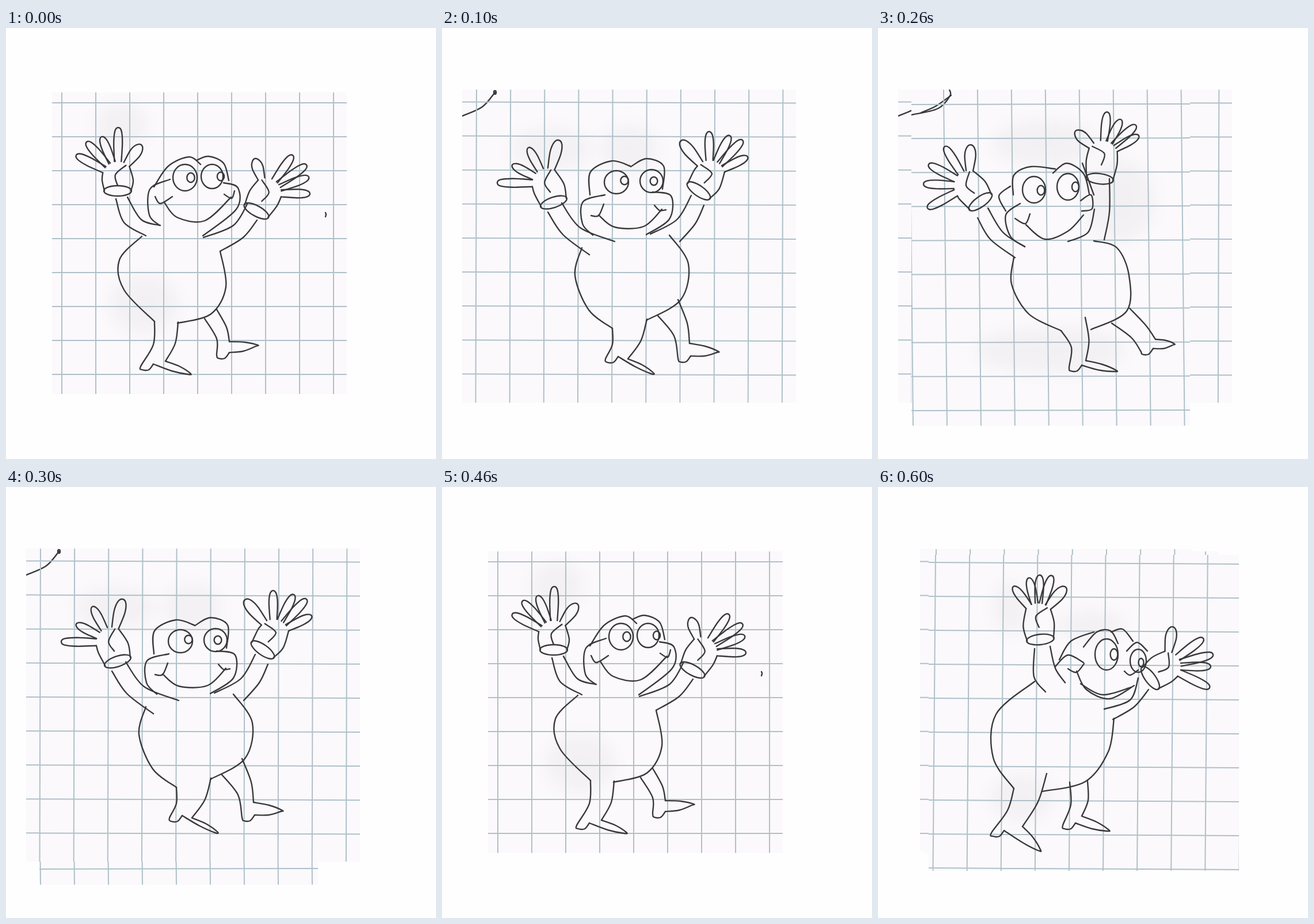
These frames come from a looping animation (747 px wide and 749 px high, 0.7 s). An HTML page:

```html
<!DOCTYPE html>
<html lang="en">
<head>
<meta charset="utf-8">
<title>Waving pencil figure</title>
<style>
html, body { margin: 0; width: 100%; height: 100%; overflow: hidden; background: #fefefe; }
#stage { display: block; width: 747px; height: 749px; }
.ink { fill: none; stroke: #39393b; stroke-width: 2.4; stroke-linecap: round; stroke-linejoin: round; }
.grid { fill: none; stroke: #afc0ca; stroke-width: 2; }
.smudge { fill: #77707a; opacity: .06; filter: url(#soft); }
.layer { animation: 700ms step-end infinite; }
</style>
</head>
<body>
<svg id="stage" viewBox="0 0 747 749">
<defs><filter id="soft" x="-50%" y="-50%" width="200%" height="200%"><feGaussianBlur stdDeviation="14"/></filter></defs>
</svg>
<script>
const points = text => text.trim().split(/\s+/).map(s => s.split(',').map(Number));
const add = (a, b, k = 1) => [a[0] + b[0] * k, a[1] + b[1] * k];
const mix = (a, b, k = .5) => [a[0] + (b[0] - a[0]) * k, a[1] + (b[1] - a[1]) * k];
const unit = (a, b) => {
  const d = [b[0] - a[0], b[1] - a[1]], len = Math.hypot(...d);
  return [d[0] / len, d[1] / len];
};
const normal = u => [-u[1], u[0]];

// A smooth pencil line through the given points.
function line(p) {
  const at = i => p[Math.max(0, Math.min(p.length - 1, i))];
  let d = 'M' + p[0];
  for (let i = 0; i < p.length - 1; i++) {
    const [a, b, c, e] = [at(i - 1), at(i), at(i + 1), at(i + 2)];
    d += `C${add(b, add(c, a, -1), 1 / 6)} ${add(c, add(b, e, -1), 1 / 6)} ${c}`;
  }
  return `<path class="ink" d="${d}"/>`;
}
const draw = text => text.split('/').map(s => line(points(s))).join('');
const oval = (x, y, rx, ry, cls = 'ink', turn = 0) =>
  `<ellipse class="${cls}" cx="${x}" cy="${y}" rx="${rx}" ry="${ry}" transform="rotate(${turn} ${x} ${y})"/>`;
const smudge = (...o) => oval(...o, 'smudge');
const eye = (x, y, rx, ry, px, py) => oval(x, y, rx, ry) + oval(px, py, rx * .32, ry * .36);

// Fingers fan out of the palm from the little finger to the thumb.
function hand(text) {
  const [palm, wrist, ...tips] = points(text);
  const up = unit(wrist, palm), across = normal(up);
  const first = unit(palm, tips[0]), last = unit(palm, tips[tips.length - 1]);
  const side = Math.sign(first[0] * last[1] - first[1] * last[0]);
  const edge = (u, s) => line([
    add(add(palm, u, 26), normal(u), 6 * s),
    add(add(mix(palm, wrist, .35), across, 27 * s), up, 2),
    add(wrist, across, 23 * s)
  ]);
  const fingers = tips.map((tip, i) => {
    const w = i === tips.length - 1 ? 9.5 : 7.5, u = unit(palm, tip), n = normal(u);
    const base = add(palm, u, 26), mid = mix(base, tip, .55), round = add(tip, u, -6);
    return line([add(base, n, 6), add(mid, n, w), add(round, n, w * .75), tip,
      add(round, n, -w * .75), add(mid, n, -w), add(base, n, -6)]);
  }).join('');
  const turn = Math.atan2(across[1], across[0]) * 180 / Math.PI;
  const crease = line([add(palm, last, 24), add(palm, normal(last), -5 * side), add(palm, up, -16)]);
  return fingers + edge(first, -side) + edge(last, side) + crease + oval(...wrist, 24, 9, 'ink', turn);
}

// Back of hip, back of knee, heel, toe, instep, front of hip.
function leg(text) {
  const [back, knee, heel, toe, instep, front] = points(text);
  const arch = add(heel, [22, -4]);
  return line([back, knee, heel, add(heel, [3, 6]), add(heel, [14, 6]), arch]) +
    line([arch, add(mix(arch, toe), [0, 4]), add(toe, [-3, 2]), toe, add(mix(toe, instep), [2, -2]), instep]) +
    line([instep, add(mix(instep, front), [6, 3]), front]);
}

// Squared paper cut to a box; v and h are [first, pitch, lean].
function sheet([x, y, right, bottom], v, h, extra = '') {
  let d = '';
  for (let k = 0; k < 10; k++) {
    const gx = v[0] + k * v[1], gy = h[0] + k * h[1];
    d += `M${gx} ${y}L${gx + v[2]} ${bottom}M${x} ${gy}L${right} ${gy + h[2]}`;
  }
  const w = right - x, t = bottom - y;
  return `<svg x="${x}" y="${y}" width="${w}" height="${t}" viewBox="${x} ${y} ${w} ${t}">
    <rect x="${x}" y="${y}" width="${w}" height="${t}" fill="#fbf9fb"/>${extra}<path class="grid" d="${d}"/></svg>`;
}

const reach = () => {
  const hands = hand('194,258 194,283 122,221 140,198 166,189 195,173 235,203') +
    hand('452,287 435,318 528,288 526,259 522,238 498,221 432,227');
  const eyes = eye(311, 260, 21, 23, 321, 260) + eye(358, 258, 19, 21, 373, 258);
  const head = draw(`257,276 282,240 318,224 338,237 / 331,230 352,223 378,235 387,265 /
    285,263 250,280 249,325 267,343 / 259,293 268,305 289,293 /
    378,269 403,278 400,315 342,361 / 379,289 392,296 397,283`);
  const smile = draw('275,303 297,329 345,335 391,294');
  const arms = draw('191,297 205,338 243,361 / 211,294 235,333 268,343 / 420,304 395,343 343,364 / 436,334 412,364 372,388');
  const body = draw('236,362 197,403 205,455 258,510 / 372,388 382,450 356,497 298,513');
  const legs = leg('258,510 256,550 234,588 320,600 277,579 299,511') +
    leg('345,505 366,540 366,568 437,551 388,545 366,489');
  return hands + eyes + head + smile + arms + body + legs;
};

const cheer = () => {
  const hands = hand('183,270 194,303 96,269 122,238 150,208 203,195') +
    hand('465,256 446,283 531,224 522,195 500,187 464,180 415,196');
  const eyes = eye(303, 268, 21, 20, 317, 265) + eye(364, 266, 20, 20, 368, 266);
  const head = draw(`283,290 245,302 244,340 262,360 / 257,290 258,250 295,231 327,240 /
    328,241 355,227 385,240 383,280 / 366,285 398,292 395,332 355,359 /
    259,326 272,326 281,306 / 369,308 378,317 389,316`);
  const smile = draw('272,325 300,346 350,345 382,315');
  const arms = draw('184,320 210,359 256,394 / 208,304 240,347 300,371 / 433,291 408,333 362,358 / 455,308 440,340 413,371');
  const body = draw('243,382 231,430 255,490 296,522 / 395,360 428,410 415,472 355,508');
  const legs = leg('296,522 296,550 284,575 367,599 323,575 356,506') +
    leg('375,500 403,535 410,574 480,562 430,548 410,472');
  return hands + eyes + head + smile + arms + body + legs;
};

const lean = () => {
  const hands = hand('158,274 178,302 86,313 79,271 88,237 116,206 161,203') +
    hand('390,222 385,262 453,187 448,169 422,159 398,146 343,179');
  const eyes = eye(271, 281, 20, 23, 283, 282) + eye(330, 276, 19, 23, 343, 276);
  const head = draw(`230,275 210,292 222,318 / 235,290 236,256 265,241 308,245 /
    304,252 328,235 357,253 367,288 / 355,235 375,290 / 247,305 222,325 230,362 255,380 /
    238,331 256,340 264,323 / 352,300 370,290 372,314 354,318 / 376,315 365,355 330,371`);
  const smile = draw('257,342 290,367 330,353 357,325');
  const arms = draw('173,330 195,367 238,399 / 191,313 217,355 255,380 / 402,262 402,320 393,368');
  const body = draw('236,399 232,445 262,497 318,526 / 375,370 415,382 436,430 432,492 370,524');
  const legs = leg('318,526 336,555 332,590 414,595 361,578 360,503') +
    leg('406,513 440,538 456,561 515,549 482,541 437,487');
  return hands + eyes + head + smile + arms + body + legs;
};

const turn = () => {
  const hands = hand('216,246 226,278 164,192 184,180 198,174 220,155 254,187') +
    hand('443,297 423,316 512,326 522,286 520,267 506,242 440,230');
  const eyes = eye(333, 282, 20, 26, 344, 284) + eye(383, 295, 18, 16, 390, 297);
  const head = draw(`257,320 272,280 315,256 / 262,300 280,293 297,301 / 255,310 258,338 275,358 /
    278,322 290,330 304,316 / 307,255 332,238 357,248 364,275 / 360,255 376,251 388,264 /
    362,278 395,262 413,293 / 405,312 395,350 352,377 / 384,312 392,319 403,314`);
  const smile = draw('287,332 308,355 360,357 404,330');
  const arms = draw('215,294 225,335 254,368 / 241,290 258,335 284,362 / 235,292 252,335 280,361 / 424,332 400,372 373,396');
  const body = draw('236,357 199,408 205,475 232,504 / 373,396 388,435 360,495 291,523');
  const legs = leg('232,504 239,545 216,588 292,599 257,577 294,511') +
    leg('330,513 345,535 334,576 418,574 371,556 363,498');
  return hands + eyes + head + smile + arms + body + legs;
};

const shout = () => {
  const hands = hand('278,228 282,265 235,173 262,158 281,153 302,154 326,174') +
    hand('500,312 473,332 576,349 578,312 582,291 565,263 512,243');
  const eyes = eye(397, 291, 20, 27, 410, 291) + eye(452, 302, 14, 20, 457, 305);
  const head = draw(`315,300 335,268 375,252 / 308,312 330,292 357,305 / 330,316 345,322 358,307 /
    357,278 380,252 404,250 417,272 / 405,252 425,247 443,268 / 432,285 450,270 468,285 /
    428,320 438,327 452,318 / 452,332 438,370 393,386`);
  const smile = draw('345,320 362,352 402,368 445,345 / 352,342 390,361 440,348');
  const arms = draw('272,281 271,330 291,356 / 299,277 308,315 325,340 / 470,352 445,382 408,404');
  const body = draw('272,338 205,395 200,470 236,524 / 410,402 400,460 360,512 285,529');
  const legs = leg('236,524 225,562 197,601 282,630 251,590 293,498') +
    leg('333,513 335,552 321,588 401,596 354,572 364,511');
  return hands + eyes + head + smile + arms + body + legs;
};

const reachPaper = sheet([80, 112, 592, 636], [97, 59, 0], [130, 59, 0],
  smudge(200, 170, 45, 40) + smudge(240, 480, 60, 50) + draw('555,321 556,324 555,328'));
const cheerPaper = sheet([35, 107, 615, 651], [60, 59.15, -1.5], [128.5, 59.1, 2],
  smudge(190, 210, 70, 35) + smudge(325, 210, 50, 40) + draw('35,153 70,137 92,112') + oval(92, 112, 2, 3));
const leanPaper = sheet([58, 107, 542, 691], [55, 58.95, 6], [133, 59.1, -1],
  smudge(290, 200, 90, 40) + smudge(420, 300, 60, 70) + smudge(300, 560, 130, 40) +
  draw('58,151 104,140 125,118 124,107 / 75,147 100,136 127,117'));
const leanStrip = sheet([58, 640, 542, 691], [59.5, 59, .5], [664, 59.1, -1]);
const turnPaper = sheet([73, 108, 545, 632], [101, 59.2, 0], [129.5, 59.05, 0],
  smudge(190, 270, 70, 50) + smudge(360, 490, 50, 40));
const shoutPaper = sheet([88, 118, 627, 667], [100, 59.1, -4.5], [131, 59, 3],
  smudge(230, 210, 30, 45) + smudge(370, 240, 60, 25) + smudge(250, 540, 55, 40));

// Each layer with the tenths of a second in which it shows; papers pile up.
const layers = [
  [leanStrip, '3'], [cheerPaper, '123'], [cheer(), '13'], [leanPaper + lean(), '2'],
  [reachPaper, '0456'], [reach(), '04'], [turnPaper, '56'], [turn(), '5'], [shoutPaper + shout(), '6']
];
let css = '', art = '';
layers.forEach(([content, slots], i) => {
  let steps = '';
  for (let s = 0; s < 7; s++)
    steps += `${Math.max(0, s / 7 * 100 - .001)}%{visibility:${slots.includes(s) ? 'visible' : 'hidden'}}`;
  css += `@keyframes show${i}{${steps}}`;
  art += `<g class="layer" style="animation-name:show${i}">${content}</g>`;
});
document.head.insertAdjacentHTML('beforeend', `<style>${css}</style>`);
document.getElementById('stage').insertAdjacentHTML('beforeend', art);
</script>
</body>
</html>
```
